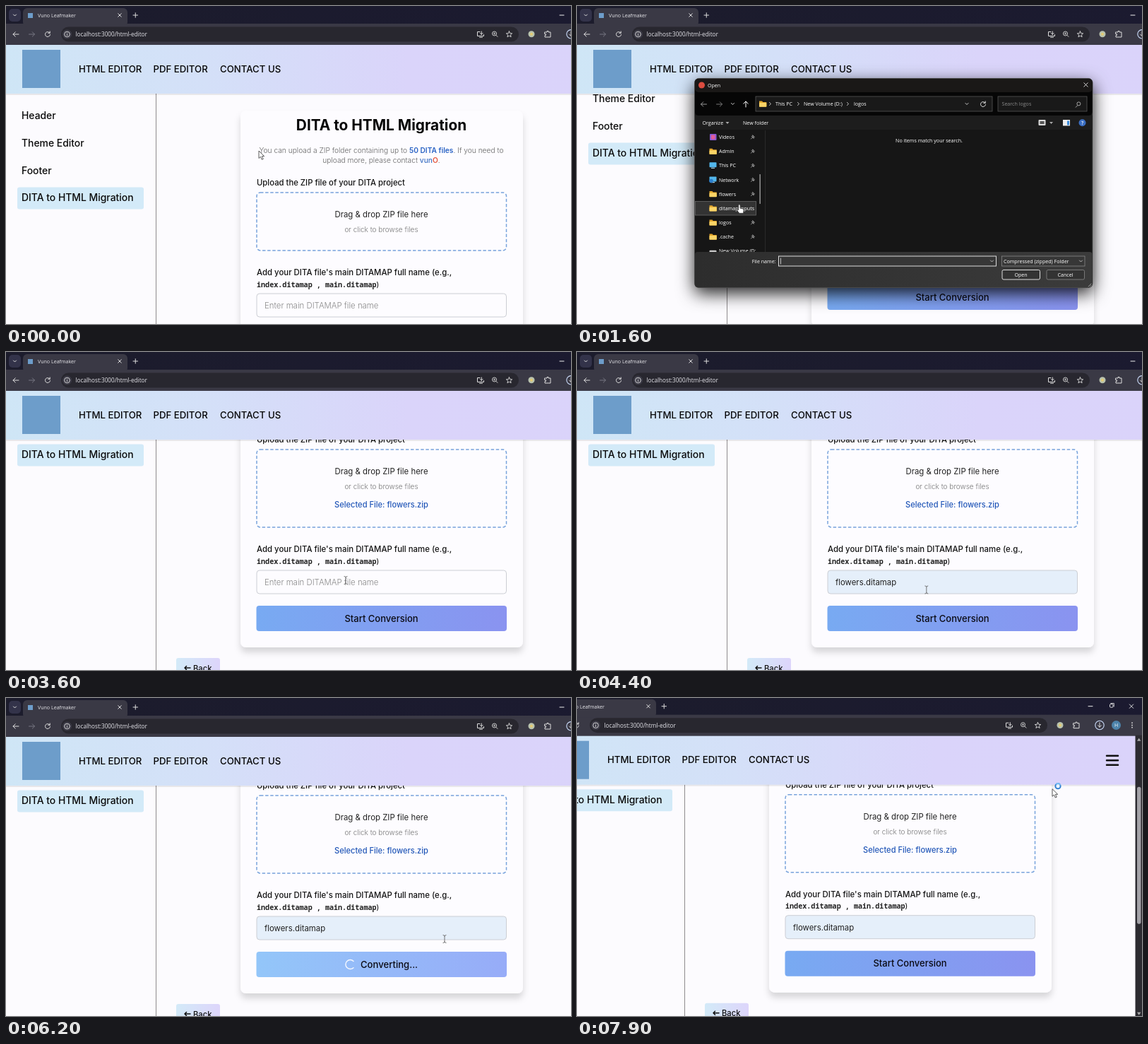
Recreate the animation shown at these times as an HTML page. Size 800 by 450 pixels, loop 8 s.

```html
<!DOCTYPE html>
<html lang="en">
<head>
<meta charset="utf-8">
<title>DITA migration</title>
<style>
html,body{margin:0;width:100%;height:100%;overflow:hidden;background:#fcfbfe}
svg{display:block;width:800px;height:450px}
text{font-family:Inter,sans-serif;white-space:pre}
.ui text{font-family:"Open Sans","Noto Sans",sans-serif}
text.mono{font-family:"Noto Sans Mono","DejaVu Sans Mono",monospace}
</style>
</head>
<body>
<svg id="stage" viewBox="0 0 800 450"></svg>
<script>
const LOOP = 8000;
const SELECTED_GAP = 28;

const text = (x, y, str, size, fill = '#111', weight = 400, more = '') =>
  `<text x="${x}" y="${(y + size * .36).toFixed(2)}" font-size="${size}" fill="${fill}" font-weight="${weight}" ${more}>${str}</text>`;
const mid = 'text-anchor="middle"';
const label = (x, y, str, more = '', fill = '#fff') => text(x, y, str, 7.1, fill, 500, more);
const rect = (x, y, w, h, fill, r = 0, more = '') =>
  `<rect x="${x}" y="${y}" width="${w}" height="${h}" rx="${r}" fill="${fill}" ${more}/>`;
const line = (d, color = '#ddd', width = 1, more = '') =>
  `<path d="${d}" fill="none" stroke="${color}" stroke-width="${width}" stroke-linecap="round" stroke-linejoin="round" ${more}/>`;
const dot = (x, y, r, fill, more = '') => `<circle cx="${x}" cy="${y}" r="${r}" fill="${fill}" ${more}/>`;
const group = (id, body, more = '') => `<g id="${id}" ${more}>${body}</g>`;
const gradient = (id, stops, more = '') => `<linearGradient id="${id}" ${more}>` +
  stops.map((c, i) => `<stop offset="${i / (stops.length - 1)}" stop-color="${c}"/>`).join('') + '</linearGradient>';

const arrowLeft = (x, y, c) => line(`M${x + 4} ${y}h-8m3.2 -3.2l-3.2 3.2 3.2 3.2`, c);
const arrowRight = (x, y, c) => line(`M${x - 4} ${y}h8m-3.2 -3.2l3.2 3.2 -3.2 3.2`, c);
const chevron = (x, y, c) => line(`M${x - 2} ${y - 1}l2 2 2-2`, c);
const reload = (x, y) => line(`M${x + 3} ${y - 1.8}a3.5 3.5 0 1 0 .5 2.3m-.3-4.6v2.4h-2.4`);
const cross = (x, y, r = 2.7) => line(`M${x - r} ${y - r}l${2 * r} ${2 * r}m0 ${-2 * r}l${-2 * r} ${2 * r}`, '#eee', .9);
const lens = (x, y) => dot(x, y, 3, 'none', 'stroke="#ccc"') + line(`M${x + 2.3} ${y + 2.3}l2.2 2.2`, '#ccc');

const defs = `<defs>
${gradient('headerFill', ['#cfe6f6', '#d4e0f8', '#dad4fa', '#dad3fa'])}
${gradient('idle', ['#78aaf2', '#8a93f0'])}
${gradient('busy', ['#93c6f9', '#97acf8'])}
${gradient('backFill', ['#d3eaf8', '#ddd5fb'])}
${gradient('tabsFill', ['#1c1c2c', '#1b1a30'])}
${gradient('folderFill', ['#ffe189', '#f9c645'], 'x2="0" y2="1"')}
${gradient('footFill', ['#2d2d2d', '#3b3b3b'])}
<filter id="soft" x="-20%" y="-20%" width="140%" height="150%"><feDropShadow dx="0" dy="7" stdDeviation="5" flood-color="#000" flood-opacity=".15"/></filter>
<filter id="deep" x="-20%" y="-20%" width="140%" height="150%"><feDropShadow dx="0" dy="8" stdDeviation="12" flood-color="#000" flood-opacity=".85"/></filter>
<clipPath id="navClip"><rect x="167" y="176" width="98" height="172"/></clipPath>
<clipPath id="rowClip"><rect x="196" y="276" width="47" height="20"/></clipPath>
</defs>`;

function sidebar() {
  return rect(16, 256.5, 179, 31, '#d3eaf8', 3) +
    ['Header', 'Theme Editor', 'Footer', 'DITA to HTML Migration']
      .map((s, i) => text(22, 155 + i * 38.8, s, 13.9, '#0a0a0a', 450)).join('');
}

function form() {
  const upper = text(531.5, 168.5, 'DITA to HTML Migration', 20.8, '#060606', 700, mid) +
    text(531.5, 204.5, 'You can upload a ZIP folder containing up to <tspan font-weight="600" fill="#2962c4">50 DITA files</tspan>. If you need to', 10.2, '#666', 300, mid) +
    text(531.5, 218, 'upload more, please contact <tspan font-weight="500" fill="#3f72c4">vun</tspan><tspan font-weight="600" fill="#e5573f">O</tspan>.', 10.2, '#666', 300, mid) +
    text(355, 250, 'Upload the ZIP file of your DITA project', 11.3, '#151515', 500) +
    rect(355, 264, 353.5, 82, 'none', 5, 'id="drop" stroke="#78a3dc" stroke-width="1.5" stroke-dasharray="4.5 2.6"') +
    text(531.5, 295, 'Drag &amp; drop ZIP file here', 11.4, '#222', 400, mid) +
    text(531.5, 316.5, 'or click to browse files', 10, '#777', 300, mid) +
    text(531.5, 342, 'Selected File: flowers.zip', 11.1, '#2257b8', 450, mid + ' id="selected"');
  const lower = text(355, 377, 'Add your DITA file\'s main DITAMAP full name (e.g.,', 11.4, '#151515', 500) +
    text(355, 394, 'index.ditamap , main.ditamap<tspan font-family="Inter,sans-serif" font-weight="500">)</tspan>', 10.1, '#222', 600, 'class="mono"') +
    rect(355, 407, 353.5, 33, '#fdfcff', 4, 'id="field" stroke="#ccced4"') +
    text(366, 424, '', 11.4, '#888', 300, 'id="value"') +
    rect(354.5, 457, 354.5, 36, 'url(#idle)', 4, 'id="button"') +
    text(531.5, 475, 'Start Conversion', 13, '#0b0b14', 550, mid + ' id="start"') +
    group('converting', text(502, 475, 'Converting...', 13.1, '#0b0b14', 550) +
      line('M492 470.4a6.5 6.5 0 1 0 0 9.2', '#f5f8ff', 1.4, 'id="spinner"')) +
    rect(241, 531, 62, 30, 'url(#backFill)', 3) +
    line('M261 545h-8m2.5-2.5l-2.5 2.5 2.5 2.5', '#111', 1.5) +
    text(265, 545.5, 'Back', 11.2, '#111', 500);
  return rect(332, 148, 400, 368, '#fdfcff', 8, 'id="card" filter="url(#soft)"') + upper + group('lower', lower);
}

function header() {
  return rect(0, 123, 852, 3, '#000', 0, 'opacity=".08"') + rect(0, 54, 852, 70, 'url(#headerFill)') +
    rect(23, 62, 54, 54, '#6d9dca') +
    [[103, 'HTML EDITOR'], [208.5, 'PDF EDITOR'], [303, 'CONTACT US']]
      .map(([x, s]) => text(x, 89, s, 13.2, '#050505', 550)).join('') +
    line('M810 83h16m-16 6.5h16m-16 6.5h16', '#111', 2.5);
}

function browser() {
  return rect(0, 0, 870, 30, 'url(#tabsFill)') + rect(0, 25, 870, 30, '#3a3945') +
    rect(4, 4, 17, 18, '#33334a', 5) + chevron(12.5, 13) +
    rect(24, 3, 148, 26, '#3a3945', 6) + rect(31, 10, 7, 7, '#6d9dca') +
    label(45, 13.3, 'Vuno Leafmaker', '', '#e6e6ea') + cross(161, 13, 2.3) +
    line('M180 13h6.5m-3.25-3.25v6.5') +
    line('M784 13h6', '#eee') + rect(814.5, 10, 4.5, 4.5, 'none', 1, 'stroke="#eee" stroke-width=".9"') +
    line('M815.8 8.8h4.5v4.5', '#eee', .8) + cross(845, 13) +
    arrowLeft(14, 40) + arrowRight(36.5, 40, '#777783') + reload(59, 40) +
    rect(78, 29.5, 648, 21, '#28272f', 10.5) + dot(86.5, 40, 6.5, '#3c3b47') +
    dot(86.5, 40, 3.8, 'none', 'stroke="#ddd" stroke-width=".9"') + line('M86.5 39.8v2m0-3.8v.1', '#ddd', .9) +
    text(98.5, 40, 'localhost:3000/html-editor', 8.2, '#e4e4ea', 450) +
    line('M671 36.5h-3.5v6h9v-2m-6 3.8h4m-1.2-8.3v4.3m-1.8-1.8l1.8 1.8 1.8-1.8') +
    lens(691.5, 39) + line('M690.2 39h2.6m-1.3-1.3v2.6', '#ddd', .7) +
    line('M712.5 35.8l1.2 2.8 3 .2-2.3 2 .7 3-2.6-1.6-2.6 1.6.7-3-2.3-2 3-.2z', '#ddd', .9) +
    dot(744, 39.8, 4.5, '#b9c3ae') + dot(744, 39.8, 2, '#e4cb72') +
    line('M763 37h3v-1.5h2v1.5h3v7h-8v-2.4h1.3v-2h-1.3z') +
    dot(800, 39.8, 6.2, 'none', 'stroke="#cfe0ff" stroke-width="1.1"') + line('M800 36v6.5m-2.5-2.5l2.5 2.5 2.5-2.5') +
    dot(823.5, 39.8, 6.5, '#4d83ab') + text(823.5, 39.8, 'H', 7, '#fff', 400, mid) +
    dot(846, 36.5, .9, '#ddd') + dot(846, 39.8, .9, '#ddd') + dot(846, 43, .9, '#ddd') +
    rect(850.5, 54, 20, 410, '#2c2b31') + rect(853, 127, 5.5, 194, '#a3a2a8', 2.7) +
    '<path d="M853 62l2.7-4 2.7 4zM853 446l2.7 4 2.7-4z" fill="#aaa"/>';
}

const smallFolder = (x, y) => `<path d="M${x} ${y - 4}h4l1.3 1.5h5v6.5h-10.3z" fill="#e3a62b"/>` + rect(x, y - 1.5, 10.3, 5.7, '#fbd568', .8);
const pin = y => line(`M246.5 ${y + 2.5}l2-2m-1.3-1.7l3 3m-1.3-4.3l2.5 2.5-1.6 1z`, '#aaa', .9);

function bigFolder(x, y, kind) {
  let body = `<path d="M${x - 24} ${y - 16}q0-4 4-4h12l5 5h23q4 0 4 4v12h-48z" fill="#e2a62f"/>` +
    rect(x - 24, y - 11, 48, 31, 'url(#folderFill)', 3);
  if (kind === 'tag') body += rect(x - 2, y - 11, 19, 17, '#f7f4ea', 1) +
    rect(x - 13, y - 9, 17, 9, '#2e6fc2', 1) + rect(x + 6, y - 7, 9, 3, '#5c92d6');
  if (kind === 'docs') body += rect(x - 7, y - 12, 16, 18, '#f3eee0', 1) +
    `<path d="M${x - 3} ${y - 9}h14l4 4v13h-18z" fill="#fbf8ef"/>`;
  if (kind) body += `<path d="M${x - 24} ${y + 8}h16l5-3h27v11q0 4-4 4h-40q-4 0-4-4z" fill="#fbcd55"/>`;
  else body += line(`M${x - 23} ${y + 6}h46`, '#8d8b83', 4, 'stroke-linecap="butt"') +
    line(`M${x - 23} ${y + 6}h46`, '#e8e2ce', 3, 'stroke-dasharray="1.2 1.6"') + rect(x + 12, y + 4, 5, 8, '#bbb', 1);
  return body;
}

function navPane() {
  const names = ['Videos', 'Admin', 'This PC', 'Network', 'flowers', 'ditamap inputs', 'logos', '.cache', 'New Volume (D:'];
  const rows = names.map((name, i) => {
    const y = 185.5 + i * 20.15;
    let icon = smallFolder(187.5, y);
    if (i === 0) icon = rect(188, y - 4.5, 9.5, 9, '#8659d6', 1) + rect(190, y - 3, 5.5, 6, '#e25c9a');
    if (i === 2 || i === 3) icon = rect(187.5, y - 4.5, 10, 7, '#53b7ec', .8) + rect(190, y + 3, 5, 1.2, '#a8cbe0');
    if (i === 3) icon += dot(190, y + 1.5, 2.8, '#2d80ce');
    if (i === 8) icon = rect(187.5, y - 1, 10, 4, '#ccc', 1);
    const caption = label(201, y, name);
    if (i === 5) return icon + group('hoverLabel', caption) +
      group('openLabel', caption, 'clip-path="url(#rowClip)"') + group('rowPin', pin(y));
    return icon + caption + (i < 8 ? pin(y) : '');
  }).join('');
  return `<g clip-path="url(#navClip)">${rect(167.5, 276.5, 86, 19.5, '#333', 0, 'id="activeRow" stroke-width=".8"')}${rows}</g>` +
    rect(258.5, 238, 1.3, 42, '#aaa', .6) + rect(266, 176, .7, 172, '#333');
}

function files() {
  const top = [['invoiceproce', 'ssing', 'tag'], ['flowers', '', 'tag'], ['Zolvane OI_Style', 'Guide_ForTestin', 'docs'], ['printer', '', 'docs'],
    ['KTR-LM-004', '', 'tag'], ['simple MD', '', 'docs'], ['Structured_sim', 'ple MD', 'docs']];
  const bottom = [['invoiceproce', 'ssing'], ['flowers', ''], ['simple MD', ''], ['KTR-LM-004', '']];
  const cell = (row, y, labelY) => ([a, b, kind], i) => {
    const x = 306.3 + i * 64.8;
    return (row === 0 && i < 5 && i % 2 === 0 ? rect(x - 28, 181, 56, 55, '#000') : '') + bigFolder(x, y, kind) +
      label(x, labelY, a, mid) + label(x, labelY + 9.8, b, mid);
  };
  return group('picked', rect(341, 268, 61, 67, '#343434') + group('pickedNext', rect(405.5, 268, 61, 67, '#4b4f55', 0, 'stroke="#5d9bd5"'))) +
    top.map(cell(0, 207, 241.5)).join('') + bottom.map(cell(1, 295.5, 329.5)).join('');
}

function dialog() {
  return rect(166.5, 102.5, 563.5, 296, '#171717', 6, 'filter="url(#deep)" stroke="#4a4a4a"') +
    rect(167, 103, 562.5, 52, '#060606', 5) + rect(167, 103, 562.5, 19, '#1a1817', 5) + rect(167, 155, 562.5, 20, '#1d1d1d') +
    dot(176.5, 112, 4.5, '#db4c3f') + label(185, 112, 'Open') + cross(720.5, 111.5) +
    group('backArrow', '') + arrowRight(201.5, 139, '#777') + chevron(220.5, 138.5, '#ccc') +
    line('M239 143v-8m-3.2 3.2l3.2-3.2 3.2 3.2', '#fff') +
    rect(253, 128, 335, 21, '#191919', 0, 'stroke="#555" stroke-width=".8"') + smallFolder(258, 138.5) +
    [272.5, 312.5, 382.5].map(x => line(`M${x} 136.5l2 2-2 2`, '#ccc')).join('') +
    label(281, 138.7, 'This PC') + label(321, 138.7, 'New Volume (D:)') +
    label(392, 138.7, '', 'id="folder"') + line('M447.5 136.5l2 2-2 2', '#ccc', 1, 'id="deeper"') +
    chevron(552, 138.5, '#ccc') + reload(575, 139) +
    rect(596, 128, 126, 21, '#191919', 0, 'stroke="#555" stroke-width=".8"') +
    label(601.5, 138.7, '', 'id="search"', '#8a8a8a') + line('M708.5 141l-2.3 2.3', '#aaa') + dot(710.4, 138.4, 2.5, 'none', 'stroke="#aaa"') +
    label(177.5, 165.3, 'Organize') + '<path d="M210.5 164h5l-2.5 3z" fill="#aaa"/>' + label(235, 165.3, 'New folder') +
    rect(653.5, 161, 10, 8, '#ddd', 1) + rect(655.5, 163, 6, 4, '#555') + '<path d="M669 164h5l-2.5 3z" fill="#aaa"/>' +
    rect(688, 161, 10, 8.5, '#eee') + rect(694, 162.5, 3, 6, '#3b8cdb') + dot(715.5, 165.3, 5, '#3b6fc4') + text(715.5, 165.3, '?', 7, '#fff', 600, mid) +
    navPane() + group('empty', label(498.5, 190, 'No items match your search.', mid)) + group('files', files()) +
    rect(167, 348, 562.5, 50, 'url(#footFill)', 4) +
    label(281.5, 361, 'File name:', 'text-anchor="end"') +
    rect(285.5, 354, 308, 14, '#373737', 0, 'id="fileField" stroke-width=".9"') + label(288, 361.3, '', 'id="fileName"') +
    line('M288.5 357v8', '#fff', .7, 'id="caret"') + chevron(587.5, 361, '#bbb') +
    rect(601.5, 354, 117.5, 14, '#373737', 0, 'stroke="#888" stroke-width=".8"') + label(604, 361.3, 'Compressed (zipped) Folder') + chevron(713.5, 361, '#bbb') +
    rect(602, 373.5, 53.5, 13.5, '#333', 2, 'stroke="#ddd"') + label(628.5, 380.3, 'Open', mid) +
    rect(665, 373.5, 53.5, 13.5, '#333', 2, 'stroke="#888" stroke-width=".8"') + label(691.5, 380.3, 'Cancel', mid) +
    line('M724 397l4-4m-1.5 4l1.5-1.5', '#999');
}

const pointer = '<path d="M0 0v10.5l2.5-2.2 1.8 4 1.9-.8-1.8-3.9h3.3z" fill="#fff" stroke="#333" stroke-width=".8"/>';
function cursors() {
  const hand = '<path d="M-1.3 1.2q0-1.5 1.2-1.5t1.2 1.5v4l4 .8q1.3.4 1.1 2l-.7 4.3h-5.8l-3.4-4.7q0-1.5 2.4 0z" fill="#fff" stroke="#333" stroke-width=".8"/>';
  const beam = line('M-2-5.5q2 0 2 1.5v8q0 1.5-2 1.5m4-11q-2 0-2 1.5m0 8q0 1.5 2 1.5', '#666', .9);
  const banned = dot(0, 0, 4.2, '#fff', 'stroke="#cf2b2b" stroke-width="1.7"') + line('M-3-3l6 6', '#cf2b2b', 1.6);
  const wait = pointer + dot(8, -4, 3.6, '#eaf4ff', 'stroke="#2f7fd2" stroke-width="2"') + line('M8-7.6a3.6 3.6 0 0 1 3.6 3.6', '#7cc0f5', 2, 'id="ring"');
  const drag = rect(-32, -57, 63, 62, '#fbf9f4', 2, 'opacity=".97"') + bigFolder(0, -27) + pointer +
    rect(5, 7, 36, 13, '#fff', 1, 'stroke="#aaa" stroke-width=".6"') + line('M9.5 13.5h5m-2.5-2.5v5', '#333') + label(18.5, 13.7, 'Copy', '', '#345a9c');
  return Object.entries({ arrow: pointer, hand, beam, banned, wait, drag }).map(([id, body]) => group(id, body)).join('');
}

const stage = document.getElementById('stage');
stage.innerHTML = defs + group('camera',
  rect(0, 50, 870, 420, '#fcfbfe') + group('side', sidebar()) + rect(212, 124, 1, 340, '#8f8b8d') +
  group('form', form()) + header() + group('browser', browser(), 'class="ui"') +
  group('dialog', dialog(), 'class="ui"') + group('cursor', cursors(), 'class="ui"'));

const $ = {};
stage.querySelectorAll('[id]').forEach(el => $[el.id] = el);
const show = (id, on) => $[id].setAttribute('display', on ? 'inline' : 'none');
const set = (id, key, value) => $[id].setAttribute(key, value);
const move = (id, x, y) => set(id, 'transform', `translate(${x.toFixed(2)} ${y.toFixed(2)})`);
const smooth = (t, from, to) => {
  const p = Math.min(1, Math.max(0, (t - from) / (to - from)));
  return p * p * (3 - 2 * p);
};

const path = [[0, 358, 205], [300, 358, 205], [800, 530, 240], [1100, 530, 240], [1500, 230, 281], [1850, 230, 281], [2300, 371, 300],
  [2400, 371, 300], [2600, 406, 317], [2700, 406, 317], [2950, 628, 379], [3050, 628, 379], [3500, 481, 323], [4200, 481, 323],
  [4700, 520, 361], [5400, 520, 361], [6150, 621, 341], [6400, 621, 341], [7100, 733, 130], [8000, 733, 130]];
const moods = [[0, 'arrow'], [500, 'hand'], [1100, 'arrow'], [1450, 'hand'], [1900, 'arrow'], [2450, 'drag'], [2750, 'arrow'],
  [3400, 'beam'], [4600, 'hand'], [4800, 'banned'], [5700, 'beam'], [6500, 'wait']];

function pointerAt(t) {
  const i = path.findIndex(([time]) => time > t);
  const [t0, x0, y0] = path[i - 1], [t1, x1, y1] = path[i];
  const p = smooth(t, t0, t1);
  return [x0 + (x1 - x0) * p, y0 + (y1 - y0) * p];
}

function drawPage(t, chosen) {
  const filled = t >= 4200, busy = t >= 4800 && t < 7000;
  const scroll = 63 * (smooth(t, 450, 800) + smooth(t, 3100, 3400));
  const gap = chosen ? SELECTED_GAP : 0;
  move('side', 0, -scroll);
  move('form', 0, -scroll);
  move('lower', 0, gap);
  set('card', 'height', 368 + gap);
  set('drop', 'height', 82 + gap);
  show('selected', chosen);

  $.value.textContent = filled ? 'flowers.ditamap' : 'Enter main DITAMAP file name';
  set('value', 'fill', filled ? '#222' : '#888');
  set('value', 'font-weight', filled ? 400 : 300);
  set('field', 'fill', filled ? '#e5effa' : '#fdfcff');
  set('button', 'fill', busy ? 'url(#busy)' : 'url(#idle)');
  show('start', !busy);
  show('converting', busy);
  set('spinner', 'transform', `rotate(${(t - 6200) * .36} 487 475)`);
}

function drawDialog(t, chosen) {
  const inputs = t >= 1850, picked = t >= 2300;
  show('dialog', t >= 1100 && !chosen);
  show('empty', !inputs);
  show('files', inputs);
  show('deeper', inputs);
  show('openLabel', inputs);
  show('hoverLabel', !inputs);
  show('rowPin', inputs);
  show('activeRow', t >= 1450);
  set('activeRow', 'fill', inputs ? '#4a4a4a' : '#333');
  set('activeRow', 'stroke', inputs ? '#999' : '#666');
  show('picked', picked);
  show('pickedNext', t >= 2500 && t < 2750);
  show('caret', !picked);
  set('fileField', 'stroke', picked ? '#888' : '#eee');
  $.backArrow.innerHTML = arrowLeft(179.5, 139, inputs ? '#fff' : '#999');
  $.folder.textContent = inputs ? 'ditamap inputs' : 'logos';
  $.search.textContent = 'Search ' + $.folder.textContent;
  $.fileName.textContent = picked ? 'flowers' : '';
}

function draw(t) {
  const chosen = t >= 3000;
  const pan = smooth(t, 7300, 7900);
  move('camera', -60 * pan, -1.3 * pan);
  drawPage(t, chosen);
  drawDialog(t, chosen);

  const mood = moods.findLast(([time]) => time <= t)[1];
  moods.forEach(([, name]) => show(name, name === mood));
  move('cursor', ...pointerAt(t));
  set('ring', 'transform', `rotate(${t * .36} 8 -4)`);
}

function tick(now) {
  draw(now % LOOP);
  requestAnimationFrame(tick);
}
draw(0);
requestAnimationFrame(tick);
</script>
</body>
</html>
```
